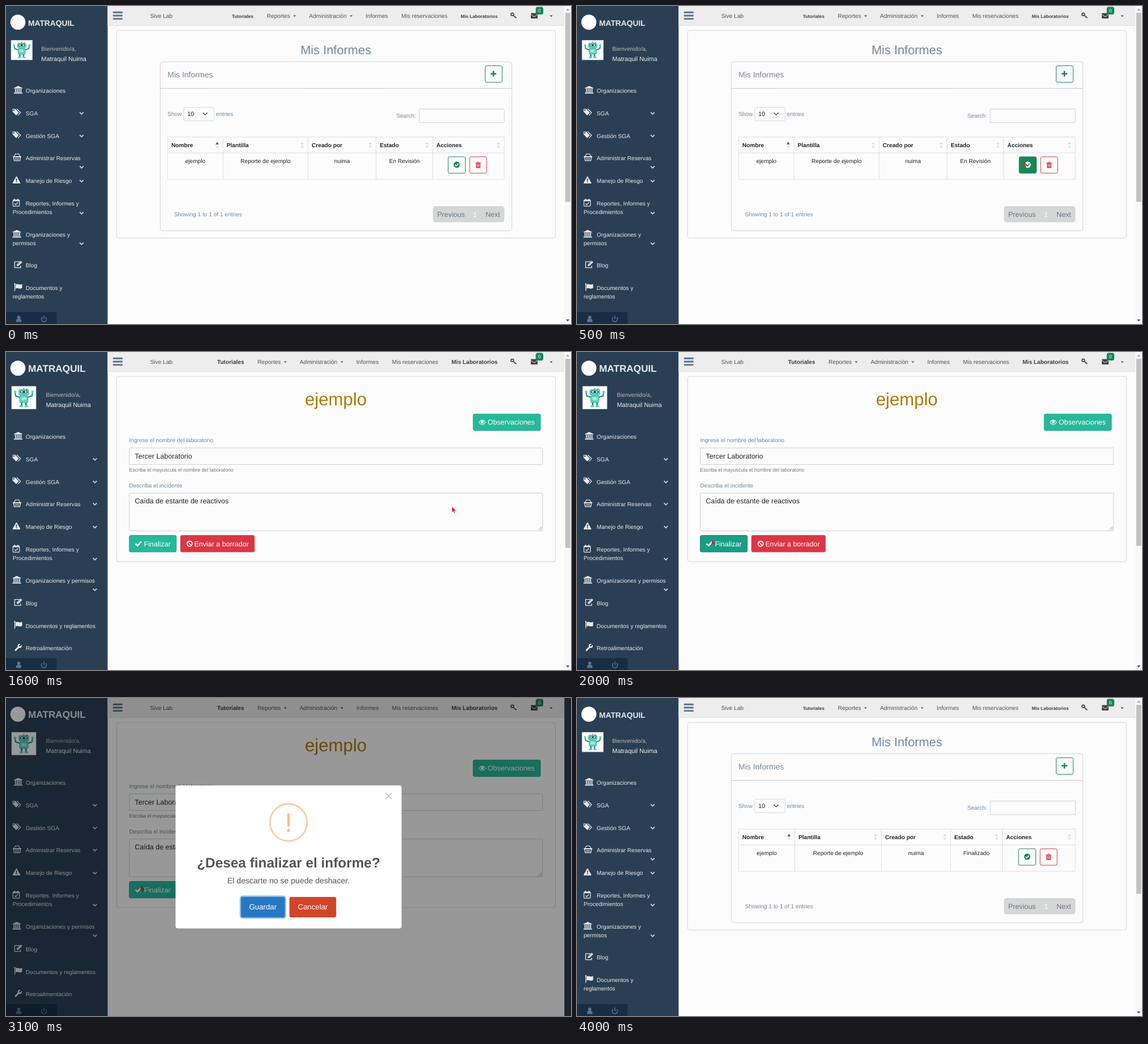
These frames come from a looping animation (998 px wide and 561 px high, 4.5 s). An HTML page with a canvas:

```html
<!DOCTYPE html>
<html lang="es">
<head>
<meta charset="utf-8">
<title>Mis Informes</title>
<style>
html, body { margin: 0; width: 100%; height: 100%; overflow: hidden; background: #fcfcfc; }
canvas { display: block; width: 998px; height: 561px; }
</style>
</head>
<body>
<canvas id="stage"></canvas>
<script>
const W = 998, H = 561, LOOP = 4500;
const canvas = document.getElementById('stage');
const dpr = window.devicePixelRatio || 1;
canvas.width = W * dpr;
canvas.height = H * dpr;
const c = canvas.getContext('2d');
c.textRendering = 'geometricPrecision';

const FONT = '"Liberation Sans", Arial, sans-serif';
const SM = 10.14, MD = 10.92, LG = 12.48;
const GREY = '#73879c', DARK = '#212529', GREEN = '#198754', TEAL = '#26b99a',
      RED = '#dc3545', PAGE = '#fcfcfc', NAVY = '#2a3f54', PALE = '#e7e9eb', NAV = '#515356';

// Basic drawing
function text(s, x, y, size = SM, color = GREY, align = 'left', bold = false) {
  c.font = (bold ? 'bold ' : '') + size + 'px ' + FONT;
  c.fillStyle = color;
  c.textAlign = align;
  c.fillText(s, x, y);
}
function rect(x, y, w, h, color) {
  c.fillStyle = color;
  c.fillRect(x, y, w, h);
}
function box(x, y, w, h, r, fill, stroke, lw = 0.9) {
  c.beginPath();
  c.roundRect(x, y, w, h, r);
  if (fill) { c.fillStyle = fill; c.fill(); }
  if (stroke) { c.strokeStyle = stroke; c.lineWidth = lw; c.stroke(); }
}
function path(pts, close) {
  c.beginPath();
  for (let i = 0; i < pts.length; i += 2) c.lineTo(pts[i], pts[i + 1]);
  if (close) c.closePath();
}
function poly(color, ...pts) {
  path(pts, true);
  c.fillStyle = color;
  c.fill();
}
function line(color, lw, ...pts) {
  path(pts);
  c.strokeStyle = color;
  c.lineWidth = lw;
  c.stroke();
}
function disc(x, y, r, color) {
  c.beginPath();
  c.arc(x, y, r, 0, 7);
  c.fillStyle = color;
  c.fill();
}
function ring(x, y, r, lw, color, from = 0, to = Math.PI * 2) {
  c.beginPath();
  c.arc(x, y, r, from, to);
  c.strokeStyle = color;
  c.lineWidth = lw;
  c.stroke();
}

// Icons, each drawn around its centre
const icons = {
  bank(k) {
    poly(k, -7.5, -3.6, 0, -7, 7.5, -3.6, 7.5, -2.6, -7.5, -2.6);
    for (const x of [-5.6, -2.4, 0.8, 4]) rect(x, -2, 1.8, 5.2, k);
    rect(-6.6, 3.4, 13.2, 1.1, k);
    rect(-7.6, 5, 15.2, 1.5, k);
  },
  tags(k) {
    poly(k, -1, -6, 1, -6, 7.6, 0.4, 2.8, 5.8, 1.9, 5, 5.9, 0.6);
    poly(k, -7.4, -6, -2.6, -6, 3.8, 0.4, -1, 5.4, -7.4, -1);
    disc(-5.2, -3.7, 1.2, NAVY);
  },
  basket(k) {
    line(k, 1.2, -5.5, -1.5, -2.6, -6.3);
    line(k, 1.2, 5.5, -1.5, 2.6, -6.3);
    rect(-3, -6.5, 6, 1.1, k);
    rect(-7.4, -2, 14.8, 2, k);
    line(k, 1.3, -6, 0, -5, 5.8, 5, 5.8, 6, 0);
    for (const x of [-2.6, 0, 2.6]) rect(x - 0.6, 1, 1.2, 3.6, k);
  },
  warning(k) {
    c.lineJoin = 'round';
    path([0, -5.6, 6, 5.2, -6, 5.2], true);
    c.fillStyle = c.strokeStyle = k;
    c.lineWidth = 1.6;
    c.fill();
    c.stroke();
    rect(-0.9, -2.4, 1.8, 4, NAVY);
    rect(-0.9, 2.5, 1.8, 1.6, NAVY);
  },
  calendar(k) {
    box(-5.7, -4.8, 11.4, 11, 1, null, k, 1.2);
    rect(-5.7, -4.8, 11.4, 2.2, k);
    rect(-3.8, -6.8, 1.8, 3, k);
    rect(2, -6.8, 1.8, 3, k);
    line(k, 1.4, -2.8, 1.6, -0.8, 3.6, 3, -0.6);
  },
  edit(k) {
    line(k, 1.3, 2.5, -4.8, -6.2, -4.8, -6.2, 5.6, 4.4, 5.6, 4.4, 2);
    poly(k, -2.6, 2.8, -2.4, 0, 4.4, -6.6, 7.2, -4, 0.4, 2.6);
    line(NAVY, 0.7, -1, 0.6, 4.2, -4.6);
  },
  flag(k) {
    rect(-6.6, -6, 1.3, 12.4, k);
    disc(-6, -5.8, 1.2, k);
    c.beginPath();
    c.moveTo(-4.6, -4.6);
    c.bezierCurveTo(-1, -7.4, 1.4, -2.6, 7, -5.4);
    c.lineTo(7, 1.6);
    c.bezierCurveTo(2, 4.6, -1, 0, -4.6, 2.8);
    c.fillStyle = k;
    c.fill();
  },
  wrench(k) {
    c.lineCap = 'round';
    line(k, 3, -4.6, 5, 1.4, -1);
    c.lineCap = 'butt';
    ring(2.8, -2.6, 2.6, 2.2, k, -0.3, 4.9);
  },
  user(k) {
    disc(0, -2.8, 2.9, k);
    box(-4.8, 0, 9.6, 5.6, [3, 3, 1.5, 1.5], k);
  },
  power(k) {
    ring(0, 0.6, 4.5, 1.6, k, -0.85, Math.PI + 0.85);
    rect(-0.8, -5.8, 1.6, 6, k);
  },
  key(k) {
    ring(-2.2, -1.8, 2.4, 1.8, k);
    line(k, 1.6, -0.6, -0.2, 5, 4.6);
    line(k, 1.4, 2.2, 4.2, 3.8, 2.6);
  },
  mail(k) {
    box(-6, -4.8, 12, 9.6, 1, k);
    line('#ededed', 0.9, -6, -2.6, -1, 1.3, 1, 1.3, 6, -2.6);
  },
  plus(k) {
    rect(-1.3, -5, 2.6, 10, k);
    rect(-5, -1.3, 10, 2.6, k);
  },
  done(k, back) {
    disc(0, 0, 5.5, k);
    line(back, 1.8, -3, 0, -0.8, 2.2, 3.2, -1.8);
  },
  trash(k) {
    rect(-5, -3.9, 10, 1.2, k);
    line(k, 1, -1.9, -3.8, -1.5, -5, 1.5, -5, 1.9, -3.8);
    box(-3.9, -2.6, 7.8, 8, 1, k);
    for (const x of [-2, 0, 2]) rect(x - 0.4, -1.4, 0.8, 5, PAGE);
  },
  eye(k) {
    c.beginPath();
    c.moveTo(-5.8, 0);
    c.quadraticCurveTo(0, -8, 5.8, 0);
    c.quadraticCurveTo(0, 8, -5.8, 0);
    c.strokeStyle = k;
    c.lineWidth = 1.1;
    c.stroke();
    disc(0, -0.6, 2.6, k);
    ring(0, -0.6, 1.4, 0.6, TEAL, 3.2, 4.7);
  },
  check(k) { line(k, 2.7, -5, 0, -1.6, 3.4, 5, -3.4); },
  ban(k) {
    ring(0, 0, 4.6, 1.7, k);
    line(k, 1.6, -3.2, -3.2, 3.2, 3.2);
  },
  chevron(k) { line(k, 1.8, -3.3, -1.5, 0, 1.8, 3.3, -1.5); },
  caret(k) { poly(k, -2.5, -1.2, 2.5, -1.2, 0, 1.4); },
  cursor() { poly('#dd2233', 0, 0, 0, 9.6, 2.2, 7.6, 3.7, 11, 5.2, 10.3, 3.8, 7, 6.8, 7); }
};
function icon(name, x, y, color, back) {
  c.save();
  c.translate(x, y);
  icons[name](color, back);
  c.restore();
}

function robot(x, y, w, h) {
  rect(x, y, w, h, '#fff');
  c.save();
  c.translate(x + w / 2, y);
  c.scale(w / 37.5, h / 35);
  const k = '#5fd9bd', d = '#2f8f86';
  rect(-0.5, 2, 1, 4, d);
  disc(4.5, 5, 1.2, d);
  box(-7.5, 5, 15, 8.5, 2, k, d, 0.7);
  box(-5.8, 7, 11.6, 3.6, 1.8, '#234a55');
  disc(-3, 8.8, 1.3, '#fff');
  disc(3, 8.8, 1.3, '#fff');
  line(d, 2, -6, 17, -12.5, 15, -13.5, 9);
  line(d, 2, 6, 17, 12.5, 15, 13.5, 9);
  disc(-13.5, 8.5, 2, k);
  disc(13.5, 8.5, 2, k);
  box(-6.5, 14.5, 13, 10.5, 2, k, d, 0.7);
  rect(-3.5, 17, 7, 4, '#a8efdd');
  rect(-4.6, 25, 2.6, 5, d);
  rect(2, 25, 2.6, 5, d);
  box(-7, 29.5, 6, 2.8, 1, k);
  box(1, 29.5, 6, 2.8, 1, k);
  c.restore();
  box(x, y, w, h, 0, null, '#c8cdd2', 0.8);
}

// Sidebar: [icon, icon x, icon y, chevron y, then text lines]
const menuTop = [
  ['bank', 21.5, 148, 0, 'Organizaciones'],
  ['tags', 19, 187.5, 189, 'SGA'],
  ['tags', 19, 227.5, 229, 'Gestión SGA'],
  ['basket', 19.5, 267, 268, 'Administrar Reservas'],
  ['warning', 18.5, 307, 308.5, 'Manejo de Riesgo'],
  ['calendar', 18, 347, 365, 'Reportes, Informes y', 'Procedimientos']
];
const menuNarrow = [
  ['bank', 19, 402, 419, 'Organizaciones y', 'permisos'],
  ['edit', 21.5, 456, 0, 'Blog'],
  ['flag', 21.5, 496, 0, 'Documentos y', 'reglamentos']
];
const menuWide = [
  ['bank', 19, 402, 419, 'Organizaciones y permisos'],
  ['edit', 21.5, 441.5, 0, 'Blog'],
  ['flag', 21.5, 481.5, 0, 'Documentos y reglamentos'],
  ['wrench', 21.5, 521, 0, 'Retroalimentación']
];

function sidebar(wide) {
  rect(0, 0, 179.5, H, NAVY);
  disc(21, 28.5, 13.3, '#fff');
  text('MATRAQUIL', 39, 35.2, wide ? 17.2 : 13.8, PALE, 'left', true);
  if (wide) robot(10, 60.5, 43, 40); else robot(9, 60.5, 37.5, 34.5);
  const x = wide ? 70.5 : 62.3;
  text('Bienvenido/a,', x, 79, SM, '#bab8b8');
  text('Matraquil Nuima', x, 97.3, MD, '#ecf0f1');
  for (const [name, ix, iy, cy, first, second] of menuTop.concat(wide ? menuWide : menuNarrow)) {
    icon(name, ix, iy, PALE);
    text(first, 34.8, iy + 5, SM, PALE);
    if (second) text(second, 11.7, iy + 20.3, SM, PALE);
    const drop = name === 'basket' && !wide ? 16 : 0;
    if (cy) icon('chevron', wide ? 157 : 133.5, cy + drop, '#c4cfda');
  }
  rect(0, 540, 89.5, 21, '#172d44');
  icon('user', 22.5, 552, '#5a738e');
  icon('power', 67, 552, '#5a738e');
}

function topbar(wide) {
  rect(179.5, 0, 807, 34.5, '#ededed');
  rect(179.5, 34.2, 807, 0.8, '#d9dee4');
  for (let i = 0; i < 3; i++) box(188.8, 9.8 + i * 5.7, 17.2, 2.9, 0.8, '#5a738e');
  text('Sive Lab', 254.8, 21, SM, NAV);
  const dx = wide ? -16.4 : 0, size = wide ? SM : 8.11;
  text('Tutoriales', wide ? 373 : 399, 21, size, '#3c3e41', 'left', true);
  text('Reportes', 460.7 + dx, 21, SM, NAV);
  icon('caret', 509.7 + dx, 17.8, NAV);
  text('Administración', 535.2 + dx, 21, SM, NAV);
  icon('caret', 609.7 + dx, 17.8, NAV);
  text('Informes', 635.2 + dx, 21, SM, NAV);
  text('Mis reservaciones', 698.2 + dx, 21, SM, NAV);
  text('Mis Laboratorios', 868.5, 21, size, '#3c3e41', 'right', true);
  icon('key', 896.5, 16.5, '#444');
  icon('mail', 933, 17.3, '#444');
  box(935.7, 1.5, 13.3, 13.5, 3.5, GREEN);
  text('0', 942.3, 11.2, 8.2, '#fff', 'center');
  icon('caret', 963, 17.8, '#444');
}

function scrollbar(end) {
  rect(986.3, 0, 11.7, H, '#f8f8f8');
  rect(988, 12, 8.7, end - 12, '#c1c1c1');
  poly('#a3a3a3', 989, 8, 995.4, 8, 992.2, 4.6);
  poly('#505050', 989, 553, 995.4, 553, 992.2, 556.4);
}

function frame(wide, bottom, end) {
  rect(0, 0, W, H, PAGE);
  sidebar(wide);
  topbar(wide);
  scrollbar(end);
  box(195.3, 43, 775.2, bottom - 43, 4, PAGE, '#cfd2d5');
}

// Table layouts: column lines and row text
const review = { cols: [285.5, 383.3, 533.5, 653.7, 753.7, 880], state: 'En Revisión', btn: 781 };
const closed = { cols: [285.5, 384.7, 537.7, 659.9, 751.5, 880], state: 'Finalizado', btn: 780 };

function table({ cols, state, btn }, hover) {
  const heads = ['Nombre', 'Plantilla', 'Creado por', 'Estado', 'Acciones'];
  const row = ['ejemplo', 'Reporte de ejemplo', 'nuima', state];
  box(285.5, 231.2, 594.5, 74.6, 0, null, '#dadde0');
  line('#dadde0', 0.9, 285.5, 259.2, 880, 259.2);
  heads.forEach((h, i) => {
    const x = cols[i], r = cols[i + 1];
    if (i) line('#dadde0', 0.9, x, 231.2, x, 305.8);
    text(h, x + 6.5, 249, SM, DARK, 'left', true);
    const s = r - 10.3;
    poly(i ? '#dfe0e1' : '#5c5f62', s - 3, 244.3, s + 3, 244.3, s, 239.6);
    poly('#dfe0e1', s - 3, 246.6, s + 3, 246.6, s, 251.3);
    if (row[i]) text(row[i], (x + r) / 2, 277, SM, DARK, 'center');
  });
  box(btn, 266, 30.4, 29, 2.5, hover ? GREEN : PAGE, GREEN, 1);
  icon('done', btn + 15.2, 280, hover ? '#fff' : GREEN, hover ? GREEN : PAGE);
  box(btn + 38, 266, 30, 29, 2.5, PAGE, RED, 1);
  icon('trash', btn + 53, 280.3, RED);
}

function list(layout, hover) {
  frame(false, 409.4, 345.5);
  text('Mis Informes', 582.6, 84.5, 21.84, GREY, 'center');
  box(272.5, 98.4, 621, 298, 4, PAGE, '#cfd2d5');
  line('#c3c6c9', 0.9, 272.5, 145.4, 893.5, 145.4);
  text('Mis Informes', 285.2, 125.8, 14.04);
  box(846.4, 105.4, 30, 29.2, 2.5, PAGE, GREEN, 1);
  icon('plus', 861, 119.5, GREEN);
  text('Show', 285.2, 194);
  box(313.7, 178.6, 54, 24, 3, PAGE, '#ced4da');
  text('10', 320.3, 194.3, MD, DARK);
  line('#343a40', 1.3, 347.7, 188.3, 351.7, 192.2, 355.7, 188.3);
  text('entries', 370.8, 194);
  text('Search:', 724.3, 197.3, SM, GREY, 'right');
  box(730, 181.7, 150.2, 24, 0.5, PAGE, '#c8cbce');
  table(layout, hover);
  text('Showing 1 to 1 of 1 entries', 296.8, 371);
  box(754, 353, 126.3, 28.6, 5, '#d5d7d7');
  text('Previous', 761.8, 371.8, LG, '#6c757d');
  text('1', 828.5, 371.8, LG, '#fff', 'center');
  text('Next', 847, 371.8, LG, '#6c757d');
}

function button(x, y, w, name, label, fill, edge) {
  box(x, y, w, 29.2, 2.5, fill, edge);
  icon(name, x + 16, y + 14.6, '#fff');
  text(label, x + w - 10, y + 19, LG, '#fff', 'right');
}

function form(hover, end) {
  frame(true, 370, end);
  text('ejemplo', 582.6, 93.5, 31.2, '#ac7a08', 'center');
  button(825.2, 109.4, 118.8, 'eye', 'Observaciones', TEAL, '#169f85');
  text('Ingrese el nombre del laboratorio', 217.5, 159);
  box(217.8, 169.2, 730, 29.2, 0.5, PAGE, '#c8cbce');
  text('Tercer Laboratorio', 227.5, 188, LG, DARK);
  text('Escriba el mayuscula el nombre del laboratorio', 217.5, 211.3, 8.87, '#6c757d');
  text('Describa el incidente', 217.5, 238.7);
  box(217.8, 248.8, 730, 66.7, 0.5, PAGE, '#c8cbce');
  text('Caída de estante de reactivos', 227.5, 267.3, LG, DARK);
  line('#777', 0.8, 940.5, 314, 946.5, 308);
  line('#777', 0.8, 944, 314, 946.5, 311.5);
  button(217.8, 323.6, 83, 'check', 'Finalizar', hover ? '#169f85' : TEAL, hover ? '#0f6f5d' : '#169f85');
  button(308.3, 323.6, 130.5, 'ban', 'Enviar a borrador', RED, RED);
}

function dialog(hover) {
  form(false, 342);
  rect(986.3, 0, 11.7, H, NAVY);
  if (!hover) icon('cursor', 238, 331);
  rect(0, 0, W, H, 'rgba(0,0,0,.4)');
  box(299.5, 154.2, 399.2, 252.4, 4, '#fff');
  line('#c8c8c8', 1.7, 670.5, 167.3, 681.5, 178.3);
  line('#c8c8c8', 1.7, 681.5, 167.3, 670.5, 178.3);
  ring(499, 219.6, 32.7, 3.1, '#facea8');
  text('!', 499, 235.5, 46.8, '#f8bb86', 'center');
  text('¿Desea finalizar el informe?', 499, 299.4, 24.37, '#545454', 'center', true);
  text('El descarte no se puede deshacer.', 499, 327.3, 14.04, '#545454', 'center');
  box(412.8, 348.6, 82, 40.6, 5, 'rgba(39,120,196,.5)');
  box(415.1, 350.9, 77.4, 36, 3, hover ? '#236cb0' : '#2778c4');
  text('Guardar', 453.8, 373.4, 13.26, '#fff', 'center');
  box(500.6, 350.9, 82.6, 36, 3, '#d14529');
  text('Cancelar', 541.9, 373.4, 13.26, '#fff', 'center');
  if (hover) icon('cursor', 433, 359.5);
}

// Scenes with their end times; all changes are hard cuts
const scenes = [
  [500, () => list(review, false)],
  [1000, () => { list(review, true); icon('cursor', 788, 273); }],
  [2000, () => { form(false, 345.5); icon('cursor', 788, 273); }],
  [2500, () => { form(true, 342); icon('cursor', 238, 331); }],
  [3500, () => dialog(false)],
  [4000, () => dialog(true)],
  [LOOP, () => list(closed, false)]
];

function tick() {
  const t = performance.now() % LOOP;
  c.setTransform(dpr, 0, 0, dpr, 0, 0);
  scenes.find(([end]) => t < end)[1]();
  requestAnimationFrame(tick);
}
tick();
</script>
</body>
</html>
```
